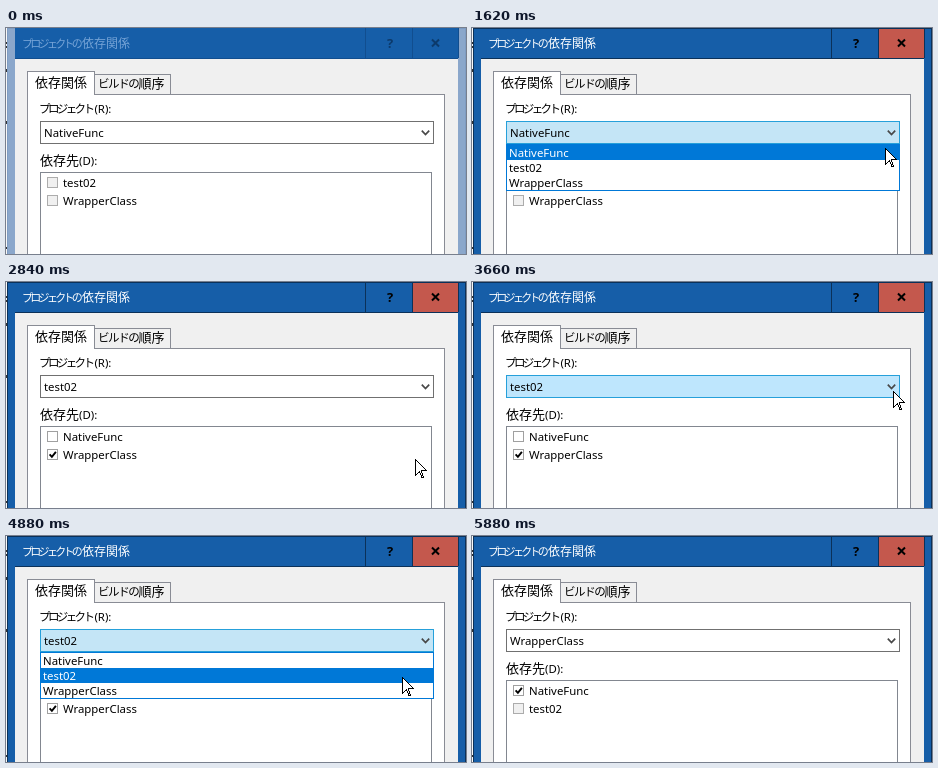
Write an HTML page that moves like this. It is 460x226 px and loops after 6900 ms.

```html
<!DOCTYPE html>
<html lang="ja">
<head>
<meta charset="utf-8">
<title>Project dependencies dialog</title>
<style>
  html, body { margin: 0; width: 100%; height: 100%; overflow: hidden; background: #fff; }
  svg { display: block; width: 460px; height: 226px; }
  text { font: 11.4px "Noto Sans", "Noto Sans CJK JP", sans-serif; fill: #000; white-space: pre; }
  .kanji { font: 13px "Noto Sans CJK JP", sans-serif; }
  .kana { font: 11.5px "Noto Sans CJK JP", sans-serif; font-kerning: none; letter-spacing: -2.6px; }
  .wide { letter-spacing: -1.4px; }
  .caption .kanji { font-size: 12px; }
  .caption .kana { font-size: 11px; letter-spacing: -2.7px; }
  .line { fill: none; stroke: #898c95; }
  .line, .box { shape-rendering: crispEdges; }
</style>
</head>
<body>
<svg viewBox="0 0 460 226">
  <rect width="460" height="226" fill="#f8f8f8"/>
  <path d="M0 14h1v2h-1zM0 18h1v2h-1zM0 41h1v3h-1zM0 93h1v3h-1zM0 219h1v2h-1z" fill="#333"/>
  <rect id="frame" class="box" x="1.5" y=".5" width="458" height="227"/>
  <rect id="bar" x="9" y="1" width="443" height="30" fill="#165ea8"/>
  <rect id="closeBox" x="407" y="1" width="45" height="29" fill="#c4584d"/>
  <path id="seams" class="box" d="M9 30.5H452M359.5 0V30M406.5 0V30M452.5 0V30" fill="none"/>
  <text id="caption" class="caption" x="16" y="20"><tspan class="kana">プロジェクトの</tspan><tspan class="kanji" dx="2">依存関係</tspan></text>
  <g id="glyphs">
    <text x="381" y="20" style="font-weight:700;font-size:13px;fill:inherit">?</text>
    <path d="M426 11.5l7 7M433 11.5l-7 7" stroke-width="2" fill="none"/>
  </g>

  <rect x="9" y="31" width="443" height="195" fill="#f0f0f0"/>
  <rect x="21" y="66" width="417" height="161" fill="#fff"/>
  <path class="line" d="M88.5 66.5H438.5V227M21.5 227V43.5H88.5V66.5M88.5 46.5H164.5V66.5"/>
  <rect x="22" y="44" width="66" height="24" fill="#fff"/>
  <text class="kanji" x="29" y="59">依存関係</text>
  <text x="92" y="60"><tspan class="kana wide">ビルドの</tspan><tspan class="kanji">順序</tspan></text>
  <text x="33" y="85"><tspan class="kana">プロジェクト</tspan><tspan dx="2">(R):</tspan></text>
  <text x="34" y="136.5"><tspan class="kanji">依存先</tspan><tspan>(D):</tspan></text>

  <rect id="combo" class="box" x="34.5" y="93.5" width="393" height="22"/>
  <text id="chosen" x="38" y="108.5"></text>
  <path id="arrow" d="M415.8 102.7l3.7 3.8 3.7-3.8" fill="none" stroke="#484848" stroke-width="1.7"/>

  <rect class="box" x="34.5" y="144.5" width="391" height="90" fill="#fff" stroke="#828790"/>
  <g id="list"></g>
  <g id="menu">
    <rect class="box" x="34.5" y="116.5" width="393" height="46" fill="#fff" stroke="#0078d7"/>
    <rect id="mark" class="box" x="35" y="117" width="392" height="15" fill="#0078d7"/>
  </g>
  <path id="cursor" class="box" d="M.5 .5V16.5L4.5 12.5L7 18.5H8.5L6.5 12.5V11.5H11.5Z" fill="#fff" stroke="#000"/>
</svg>
<script>
const LOOP = 6900;
const NAMES = ["NativeFunc", "test02", "WrapperClass"];
// Checkbox states of the two other projects, per chosen project
const CHECKS = [["disabled", "disabled"], ["off", "on"], ["on", "disabled"]];
const COMBO = {
  idle: ["#fff", "#707070"],
  hover: ["#bee6fd", "#26a0da"],
  open: ["#c4e5f6", "#26a0da"]
};
const FOCUS = {
  active: { frame: "#165ea8", edge: "#0b3159", seam: "#0b3159", caption: "#fff", glyph: "#000" },
  inactive: { frame: "#8ba7cb", edge: "#7f9cc2", seam: "#114e8f", caption: "#75a3d6", glyph: "#0c3a6b" }
};

// Each step changes only what it names
const STEPS = [
  [0, { focus: "inactive", chosen: 0, combo: "idle", fade: 0, row: 0, at: null }],
  [400, { at: [407, 159] }],
  [600, { at: [419, 117] }],
  [820, { at: [422, 100], combo: "hover" }],
  [1220, { focus: "active", combo: "open", fade: 1 }],
  [1620, { at: [413, 120] }],
  [1820, { at: [403, 134], row: 1 }],
  [2020, { at: [400, 137] }],
  [2440, { chosen: 1, combo: "idle", fade: 0 }],
  [2640, { at: [407, 165] }],
  [2840, { at: [409, 177] }],
  [3660, { at: [421, 109], combo: "hover" }],
  [3860, { at: [423, 96] }],
  [4060, { combo: "open", fade: 0.5 }],
  [4260, { fade: 1 }],
  [4460, { at: [414, 113] }],
  [4660, { at: [401, 132] }],
  [4880, { at: [396, 141] }],
  [5080, { at: [394, 148], row: 2 }],
  [5280, { at: [394, 150] }],
  [5480, { at: [394, 151], chosen: 2, combo: "idle", fade: 0 }],
  [5680, { at: [397, 164] }],
  [5880, { at: null }]
];

const $ = id => document.getElementById(id);
const set = (el, attrs) => {
  for (const k in attrs) el.setAttribute(k, attrs[k]);
  return el;
};
const add = (parent, tag, attrs) =>
  parent.appendChild(set(document.createElementNS("http://www.w3.org/2000/svg", tag), attrs));

const rows = [0, 1].map(i => {
  const y = 149 + i * 18;
  return {
    box: add($("list"), "rect", { class: "box", x: 41.5, y: y + 0.5, width: 10, height: 10 }),
    tick: add($("list"), "path", {
      d: `M43.6 ${y + 5.3}l2.3 2.5 4-5`, fill: "none", stroke: "#000", "stroke-width": 1.9
    }),
    label: add($("list"), "text", { x: 57, y: y + 10 })
  };
});
const items = NAMES.map((name, i) => {
  const item = add($("menu"), "text", { x: 37, y: 129 + i * 15 });
  item.textContent = name;
  return item;
});

function stateAt(time) {
  const state = {};
  for (const [start, change] of STEPS) {
    if (start <= time) Object.assign(state, change);
  }
  return state;
}

function draw(time) {
  const { focus, chosen, combo, fade, row, at } = stateAt(time);
  const tone = FOCUS[focus];
  set($("frame"), { fill: tone.frame, stroke: tone.edge });
  set($("bar"), { y: focus === "active" ? 1 : 0 });
  set($("closeBox"), { opacity: focus === "active" ? 1 : 0 });
  set($("seams"), { stroke: tone.seam });
  set($("glyphs"), { fill: tone.glyph, stroke: "none" });
  set($("glyphs").lastElementChild, { stroke: tone.glyph });
  $("caption").style.fill = tone.caption;

  const [fill, stroke] = COMBO[combo];
  set($("combo"), { fill, stroke });
  $("chosen").textContent = NAMES[chosen];

  const others = NAMES.filter((_, i) => i !== chosen);
  rows.forEach(({ box, tick, label }, i) => {
    const check = CHECKS[chosen][i];
    const disabled = check === "disabled";
    set(box, {
      fill: disabled ? "#f0f0f0" : "#fff",
      stroke: disabled ? "#acacac" : "#a0a0a0"
    });
    set(tick, { opacity: check === "on" ? 1 : 0 });
    label.textContent = others[i];
  });

  set($("menu"), { opacity: fade });
  set($("mark"), { y: 117 + row * 15 });
  items.forEach((item, i) => { item.style.fill = i === row ? "#fff" : "#000"; });

  set($("cursor"), { visibility: at ? "visible" : "hidden" });
  if (at) set($("cursor"), { transform: `translate(${at})` });
}

const begin = performance.now();
function tick() {
  draw((performance.now() - begin) % LOOP);
  requestAnimationFrame(tick);
}
tick();
</script>
</body>
</html>
```
